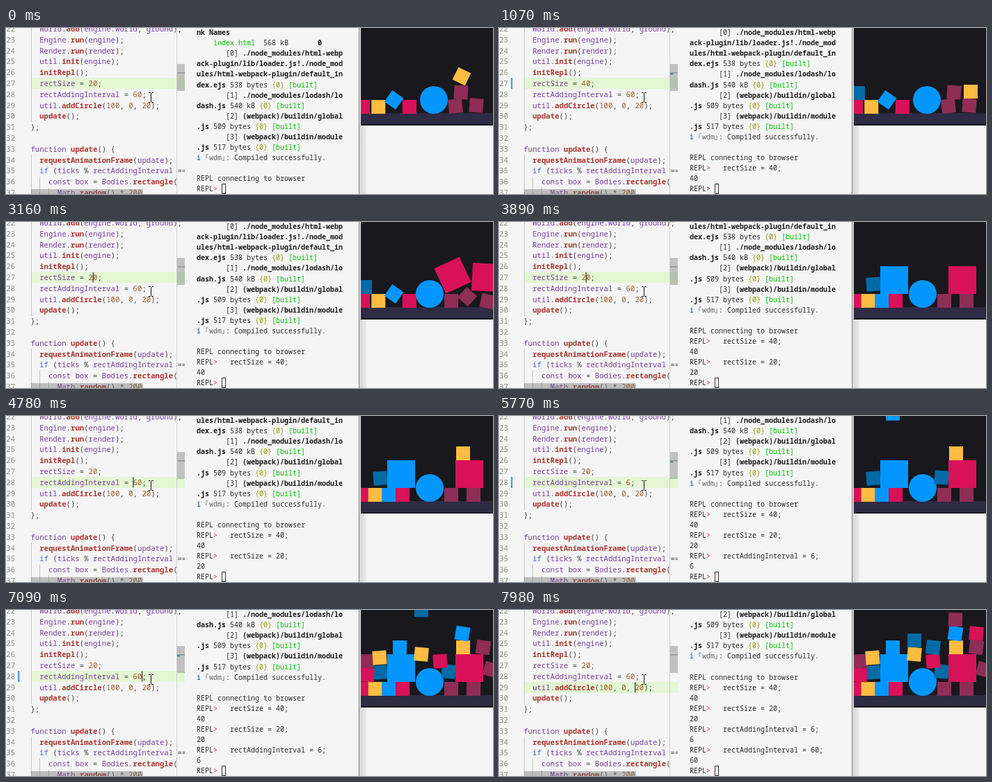
An HTML page for the animation above (8 s loop, 700 by 240 pixels).

```html
<!DOCTYPE html>
<html lang="en">
<head>
<meta charset="utf-8">
<title>Live coding with a REPL</title>
<style>
  html, body { margin: 0; width: 100%; height: 100%; overflow: hidden; background: #f5f5f5; }
  svg { display: block; }
  text { font-family: "Noto Sans Mono", "DejaVu Sans Mono", monospace; white-space: pre; }
  .code { font-size: 10.67px; }
  .term { font-size: 10px; }
</style>
</head>
<body>
<svg width="700" height="240" viewBox="0 0 700 240">
  <defs>
    <clipPath id="codeClip"><rect width="257" height="240"/></clipPath>
    <clipPath id="termClip"><rect x="258" width="249" height="224.5"/></clipPath>
    <clipPath id="worldClip"><rect x="510" width="190" height="141"/></clipPath>
    <linearGradient id="shade">
      <stop offset="0" stop-color="#d4d4d4"/><stop offset="1" stop-color="#ececec"/>
    </linearGradient>
  </defs>
  <rect width="700" height="240" fill="#f5f5f5"/>
  <g id="editor" clip-path="url(#codeClip)"></g>
  <g clip-path="url(#termClip)"><g id="log"></g></g>
  <g id="prompt"></g>
  <rect x="508" width="10" height="240" fill="url(#shade)"/>
  <path d="M507.5 0V240" stroke="#858585"/>
  <rect x="510" width="190" height="141" fill="#18181d"/>
  <rect x="510" y="123" width="189" height="16" fill="#2e2b44"/>
  <g id="world" clip-path="url(#worldClip)"></g>
</svg>
<script>
const LOOP = 8000;
const $ = id => document.getElementById(id);

function add(parent, tag, attrs, content) {
  const el = document.createElementNS('http://www.w3.org/2000/svg', tag);
  for (const k in attrs) el.setAttribute(k, attrs[k]);
  if (content) el.textContent = content;
  parent.appendChild(el);
  return el;
}
const show = (el, on) => el.setAttribute('visibility', on ? 'visible' : 'hidden');

// ---------- editor ----------
const editor = $('editor');
const FIRST = 22, CH = 6.4, WORD_END = 20;
const lineY = n => Math.round(80 + (n - 27) * 15.8);
const colX = col => 35.4 + col * CH;

const lineBg = add(editor, 'rect', { x: 36, width: 221, height: 16, fill: '#e4f6d4' });
const matches = add(editor, 'g', { fill: '#c9d0d9', opacity: 0.75 });
for (const [line, col] of [[28, 2], [35, 14]])
  add(matches, 'rect', { x: colX(col), y: lineY(line) - 8, width: 18 * CH, height: 16 });
add(editor, 'path', {
  d: 'M36.5 0V136M36.5 183V240M48.5 215V240M61.5 231V240', stroke: '#c4c4c4', fill: 'none'
});

function tokenStyle(word, next) {
  if (/^\d/.test(word)) return { fill: '#9c5d27' };
  if (/^\W/.test(word)) return { fill: '#444' };
  if (word === 'if') return { fill: '#4b69c6' };
  if (next === '(') return { fill: '#aa3731', 'font-weight': 700 };
  return { fill: '#7a3e9d' };
}

const shown = {};
function setCode(group, n, src) {
  if (shown[n] === src) return;
  shown[n] = src;
  group.textContent = '';
  for (const m of src.matchAll(/\w+|[^\w\s]+/g))
    add(group, 'text', {
      class: 'code', x: colX(m.index), y: lineY(n) + 4,
      ...tokenStyle(m[0], src[m.index + m[0].length])
    }, m[0]);
}

const lines = [
  '  World.add(engine.world, ground);',
  '  Engine.run(engine);',
  '  Render.run(render);',
  '  util.init(engine);',
  '  initRepl();',
  '  rectSize = 20;',
  '  rectAddingInterval = 60;',
  '  util.addCircle(100, 0, 20);',
  '  update();',
  '};',
  '',
  'function update() {',
  '  requestAnimationFrame(update);',
  '  if (ticks % rectAddingInterval === 0) {',
  '    const box = Bodies.rectangle(',
  '      Math.random() * 200'
];
const rows = lines.map((src, i) => {
  const n = FIRST + i;
  add(editor, 'text', { class: 'code', x: 0.3, y: lineY(n) + 4, fill: '#8c8f84' }, n);
  const g = add(editor, 'g', {});
  setCode(g, n, src);
  return g;
});

add(editor, 'path', { d: 'M245.5 0V240', stroke: '#cfcfcf' });
add(editor, 'rect', { x: 36, y: 233, width: 161, height: 7, fill: '#646464', opacity: 0.38 });
add(editor, 'rect', { x: 246, y: 52, width: 11, height: 39, fill: '#646464', opacity: 0.36 });
add(editor, 'rect', { x: 246, y: 64, width: 11, height: 1.5, fill: '#777', opacity: 0.6 });
const gitRuler = add(editor, 'rect', { x: 246, y: 65, width: 4, height: 2.5, fill: '#3f8fb8' });
const gitBar = add(editor, 'rect', { x: 17, width: 2.5, height: 16, fill: '#4fa3d9' });
const caret = add(editor, 'rect', { width: 1.3, height: 15, fill: '#44393b' });
add(editor, 'path', {
  d: 'M205 93.5H207.5L208.5 94.5L209.5 93.5H212M208.5 94.5V106.5M205 107.5H207.5L208.5 106.5L209.5 107.5H212',
  stroke: '#111', fill: 'none'
});

// Key presses; single characters are typed
const keys = [
  [300, 'back'], [450, '4'], [2720, 'back'], [2880, '2'], [4050, 'down'],
  ...Array.from({ length: 9 }, (_, i) => [4500 + 30 * i, 'right']),
  [5050, 'right'], [5200, 'del'], [6900, '0'], [7750, 'down']
];

// Editor state after all key presses up to t
function replay(t) {
  const s = { text: lines.slice(), line: 27, col: 14, since: -600 };
  const splice = (from, to, str = '') => {
    const src = s.text[s.line - FIRST];
    s.text[s.line - FIRST] = src.slice(0, from) + str + src.slice(to);
    s.col = from + str.length;
  };
  for (const [time, key] of keys) {
    if (time > t) break;
    s.since = time;
    if (key === 'back') splice(s.col - 1, s.col);
    else if (key === 'del') splice(s.col, s.col + 1);
    else if (key === 'down') s.line++;
    else if (key === 'right') s.col++;
    else splice(s.col, s.col, key);
  }
  return s;
}

const onWord = s => s.line === 28 && s.col <= WORD_END;

function drawEditor(t) {
  const now = replay(t), before = replay(t - 250);
  rows.forEach((g, i) => setCode(g, FIRST + i, now.text[i]));
  lineBg.setAttribute('y', lineY(now.line) - 8);
  caret.setAttribute('x', colX(now.col) - 0.4);
  caret.setAttribute('y', lineY(now.line) - 7.5);
  show(caret, (t - now.since) % 1000 < 500);
  show(matches, onWord(now) && onWord(before));
  const changed = before.text.findIndex((src, i) => src !== lines[i]);
  show(gitBar, changed >= 0);
  show(gitRuler, changed >= 0);
  gitBar.setAttribute('y', lineY(FIRST + changed) - 8);
}

// ---------- terminal ----------
const ROW = 15.07, SAVE_DELAY = 550;
const GREEN = '#00c000', OLIVE = '#949800', RED = '#cd3131', INK = '#2a2a2a';

function put(parent, row, col, str, fill = INK, weight = 400) {
  add(parent, 'text', {
    class: 'term', x: 274 + col * 6, y: 10.2 + row * ROW, fill, 'font-weight': weight
  }, str);
}
function repl(parent, row, cmd) {
  put(parent, row, 0, 'REPL');
  put(parent, row, 4, '>', RED);
  if (cmd) put(parent, row, 8, cmd);
}

const log = $('log');
const bold = (row, col, str) => put(log, row, col, str, '#1c1c1c', 700);
function bundle(row, id, path, size) {
  put(log, row, 7, `[${id}]`);
  bold(row, 11, path[0]);
  path.slice(1).forEach(str => bold(++row, 0, str));
  let col = path[path.length - 1].length + 1;
  put(log, row, col, size);
  col += size.length + 1;
  put(log, row, col, '{0}', OLIVE);
  put(log, row, col + 4, '[built]', GREEN);
}

bold(0, 0, 'nk Names');
put(log, 1, 4, 'index.html', GREEN);
put(log, 1, 16, '568 kB');
bold(1, 29, '0');
bundle(2, 0, ['./node_modules/html-webp', 'ack-plugin/lib/loader.js!./node_mod',
  'ules/html-webpack-plugin/default_in', 'dex.ejs'], '538 bytes');
bundle(6, 1, ['./node_modules/lodash/lo', 'dash.js'], '540 kB');
bundle(8, 2, ['(webpack)/buildin/global', '.js'], '509 bytes');
bundle(10, 3, ['(webpack)/buildin/module', '.js'], '517 bytes');
put(log, 12, 0, 'i', '#0451a5');
put(log, 12, 2, '｢', '#666');
put(log, 12, 3, 'wdm', '#666');
put(log, 12, 6, '｣', '#666');
put(log, 12, 7, ': Compiled successfully.');
put(log, 14, 0, 'REPL connecting to browser');

// Each finished edit is sent to the REPL shortly after
const commands = [
  [450, 'rectSize = 40;'], [2880, 'rectSize = 20;'],
  [5200, 'rectAddingInterval = 6;'], [6900, 'rectAddingInterval = 60;']
];
commands.forEach(([, cmd], i) => {
  repl(log, 15 + 2 * i, cmd);
  put(log, 16 + 2 * i, 0, cmd.match(/\d+/)[0]);
});
repl($('prompt'), 15);
add($('prompt'), 'rect', { x: 310.5, y: 225.5, width: 5, height: 14, fill: 'none', stroke: '#333' });

function drawTerminal(t) {
  const done = commands.filter(([time]) => time + SAVE_DELAY <= t).length;
  log.setAttribute('transform', `translate(0 ${-2 * ROW * done})`);
}

// ---------- physics view ----------
const COLORS = { P: '#d81159', Y: '#ffbc42', B: '#0496ff', D: '#006ba6', M: '#8f2d56' };
const GRAVITY = 0.0005, SPAWN = -30, FLOOR = 114;
const world = $('world');
const bodies = [];

let seed = 7;
const random = () => (seed = seed * 16807 % 2147483647) / 2147483647;
const ease = u => { u = Math.min(1, Math.max(0, u)); return u * u * (3 - 2 * u); };

class Body {
  constructor(el, land, ...pose) {
    Object.assign(this, { el, land, pose, moves: [] });
    bodies.push(this);
  }
  // Slide from the current pose to a new x, y, angle
  to(start, end, ...pose) {
    this.moves.push({ start, end, pose });
    return this;
  }
  draw(t) {
    let pose = this.pose;
    if (t < this.land) {
      const [x, y, a] = pose;
      const time = Math.max(0, t - this.land + Math.sqrt((y - SPAWN) / GRAVITY));
      pose = [x, SPAWN + GRAVITY * time * time, a];
    }
    for (const m of this.moves) {
      const k = ease((t - m.start) / (m.end - m.start));
      pose = pose.map((v, i) => v + (m.pose[i] - v) * k);
    }
    this.el.setAttribute('transform', `translate(${pose[0]} ${pose[1]}) rotate(${pose[2]})`);
  }
}

const box = (color, size, land, x, y, a = 0) => new Body(
  add(world, 'rect', { x: -size / 2, y: -size / 2, width: size, height: size, fill: COLORS[color] }),
  land, x, y, a);

// Floor row, closing up once the wedged blue box drops in
[...'PYBP'].forEach((c, i) => {
  const wedged = c === 'B';
  box(c, 20, 0, 513 + 22.3 * i, wedged ? 104 : FLOOR, wedged ? 35 : 0)
    .to(3200, 3900, 511 + 19.7 * i, FLOOR, 0);
});
new Body(add(world, 'circle', { r: 20, fill: COLORS.B }), 0, 615, 104, 0).to(1700, 2030, 609, 104, 0);

// Right-hand heap, knocked apart by the big boxes
box('M', 20, 0, 646, 113, -6).to(1700, 2030, 640, FLOOR, 0);
box('M', 20, 0, 654, 93, 3).to(1700, 2030, 663, 108, 42).to(3200, 3900, 672, FLOOR, 0);
box('M', 20, 0, 676, 112, 4).to(1700, 2030, 688, 113, 0).to(3000, 3700, 720, 125, 90);
box('Y', 20, 0, 655, 70, 26).to(100, 800, 678, 92, 90).to(1600, 2000, 714, 125, 200);
box('D', 20, 800, 516, 94).to(3200, 3900, 538, 90, -4);
box('P', 40, 1800, 650, 78, -8).to(1800, 3200, 642, 77, -25).to(3200, 3900, 666, 84, 0);
box('P', 40, 2800, 690, 80, 3).to(3200, 3700, 728, 110, 40);
box('B', 40, 3800, 568, 84);
box('Y', 20, 4600, 657, 54);
box('D', 20, 5500, 636, 89, 4);

// Fast rain: x, lowest y and colours of each pile, filled layer by layer
const piles = [
  [566, 54, 'B'], [519, 94, 'PM'], [537, 69, 'Y'], [597, 64, 'YD'],
  [624, 74, 'PD'], [656, 34, 'BM'], [686, 54, 'MP'], [697, 86, 'M']
];
piles.forEach(([x, y, colors], i) => [...colors].forEach((c, layer) =>
  box(c, 20, 5950 + 130 * i + 890 * layer, x, y - 20 * layer, (random() - 0.5) * 7 * i)));

// ---------- loop ----------
function render(t) {
  drawEditor(t);
  drawTerminal(t);
  bodies.forEach(b => b.draw(t));
}
const start = performance.now();
function tick() {
  render((performance.now() - start) % LOOP);
  requestAnimationFrame(tick);
}
tick();
</script>
</body>
</html>
```
